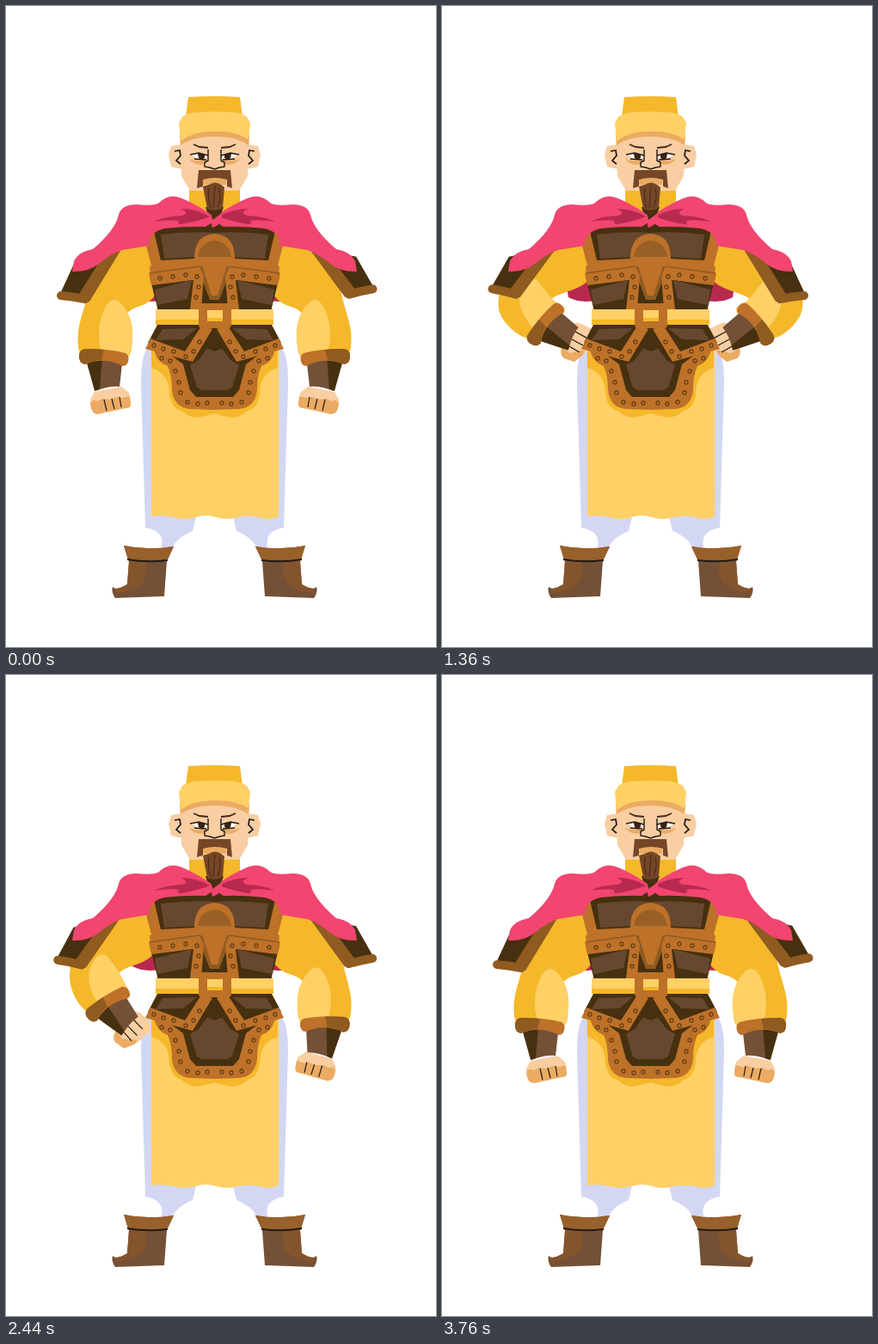
An HTML page with a canvas for the animation above (3.8 s loop, 500x746 px).

```html
<!DOCTYPE html>
<html lang="en">
<head>
<meta charset="utf-8">
<title>Warrior</title>
<style>
html, body { margin: 0; width: 100%; height: 100%; overflow: hidden; background: #fff; }
canvas { display: block; width: 500px; height: 746px; }
</style>
</head>
<body>
<canvas id="stage" width="500" height="746"></canvas>
<script>
const ctx = document.getElementById('stage').getContext('2d');
const LOOP = 3800, STEP = 40;
const C = {
  light: '#ffd066', gold: '#f4b82a', pink: '#f24570', crimson: '#b82950',
  copper: '#bd7129', rust: '#8f5b20', dark: '#46300f', brown: '#664830', boot: '#745036',
  skin: '#f8cea2', tan: '#ebab62', leg: '#d3d7f4', ink: '#201a18'
};

function fill(color, d) {
  ctx.fillStyle = color;
  ctx.fill(new Path2D(d));
}
function line(color, width, d) {
  ctx.strokeStyle = color;
  ctx.lineWidth = width;
  ctx.stroke(new Path2D(d));
}
function rivets(points) {
  ctx.strokeStyle = '#5e3a12';
  ctx.lineWidth = 1.1;
  for (const [x, y] of points) {
    ctx.beginPath();
    ctx.arc(x, y, 2.1, 0, 7);
    ctx.stroke();
  }
}
function mirrored(draw) {
  ctx.save();
  ctx.translate(485, 0);
  ctx.scale(-1, 1);
  draw();
  ctx.restore();
}
function both(draw) {
  draw();
  mirrored(draw);
}
const mix = (a, b, p) => a + (b - a) * p;

function turned(x, y, degrees, draw) {
  ctx.save();
  ctx.translate(x, y);
  ctx.rotate(degrees * Math.PI / 180);
  ctx.translate(-x, -y);
  draw();
  ctx.restore();
}

// Closed soft outline between two poses of control points.
function blob(color, from, to, p) {
  const pts = from.map(([x, y], i) => [mix(x, to[i][0], p), mix(y, to[i][1], p)]);
  ctx.fillStyle = color;
  ctx.beginPath();
  pts.forEach(([x, y], i) => {
    const [nx, ny] = pts[(i + 1) % pts.length];
    const [px, py] = pts[(i + pts.length - 1) % pts.length];
    if (!i) ctx.moveTo((px + x) / 2, (py + y) / 2);
    ctx.quadraticCurveTo(x, y, (x + nx) / 2, (y + ny) / 2);
  });
  ctx.fill();
}

const SLEEVE_DOWN = [[112, 270], [184, 270], [180, 342], [133, 356], [149, 384], [142, 418], [86, 414], [82, 380], [93, 345], [100, 312]];
const SLEEVE_UP = [[112, 270], [184, 270], [178, 322], [122, 340], [134, 347], [146, 354], [106, 392], [78, 376], [62, 350], [74, 312]];
const INNER_DOWN = [[123, 335], [144, 357], [149, 386], [140, 418], [111, 412], [106, 370]];
const INNER_UP = [[104, 310], [122, 334], [134, 347], [148, 352], [116, 390], [84, 345]];
const FOREARM_TURN = -56;

const settle = (ms, k) => ms <= 0 ? 0 : 1 - (1 + k * ms) * Math.exp(-k * ms);
const raise = (t, lowerAt) => settle(t - 520, .0108) * (1 - settle(t - lowerAt, .01));

function fist() {
  fill(C.skin, 'M103 449L134 443L143 450L145 462Q145 468 139 468L107 475Q101 475 99 468L98 458Z');
  fill(C.tan, 'M98 462Q101 457 106 460L113 457L121 458L129 455L136 456L144 454L145 464Q145 468 139 468L107 475Q101 475 99 468Z');
  line(C.ink, 1.2, 'M114 458L117 471M123 457L126 469M132 455L134 467');
}
function hipHand() {
  fill(C.skin, 'M148 373Q153 367 160 369L173 375L177 386L166 404L154 414L142 410Q137 406 139 399Z');
  fill(C.tan, 'M139 398L149 404L166 400L164 406L154 414L142 410Q137 406 139 398Z');
  line(C.ink, 1.2, 'M155 379L168 386M151 388L164 395M148 396L160 403');
}

function forearm(p) {
  ctx.save();
  ctx.translate(mix(0, 6, p), mix(0, -38, p));
  turned(113, 408, FOREARM_TURN * p, () => {
    if (p < .5) {
      ctx.save();
      ctx.translate(0, -10 * p);
      fist();
      ctx.restore();
    } else {
      turned(113, 408, -FOREARM_TURN, () => {
        ctx.translate(-6, 38);
        hipHand();
      });
    }
    fill(C.boot, 'M92 408L136 408L132 443Q120 442 104 448Z');
    fill(C.dark, 'M92 408H112L109 446L103 448Z');
    fill(C.copper, 'M85 405Q87 398 95 399Q120 399 139 404Q144 407 142 414Q139 421 134 418Q112 408 92 417Q84 416 85 405Z');
    fill(C.rust, 'M85 405Q87 398 95 399Q104 399 114 400L111 412Q101 412 92 417Q84 416 85 405Z');
  });
  ctx.restore();
}

function arm(p) {
  blob(C.gold, SLEEVE_DOWN, SLEEVE_UP, p);
  blob(C.light, INNER_DOWN, INNER_UP, p);
  forearm(p);
}

function pad(p) {
  turned(150, 270, 5 * p, () => {
    fill(C.dark, 'M80 298L134 282L96 344L62 337Z');
    fill(C.rust, 'M112 292L136 280L97 344L82 340Z');
    ctx.lineCap = 'round';
    line(C.rust, 10, 'M64 337Q77 338 92 341');
    ctx.lineCap = 'butt';
  });
}

function legs() {
  both(() => {
    fill(C.leg, 'M166 398Q157 402 157 440L162 607Q185 611 181 630H194Q198 619 217 611L222 590V398Z');
    fill(C.boot, 'M137 628Q165 634 195 629L187 646L184 687Q155 688 127 689Q122 682 124 676Q128 681 141 673L143 647Z');
    fill('#84542c', 'M143 646H163Q165 670 154 675Q143 682 128 683L124 676Q128 681 141 673Z');
    fill('#98602a', 'M137 628Q165 634 195 629L187 646Q163 648 142 645Z');
    line(C.ink, 2, 'M141 644Q163 648 188 645');
  });
}

function skirt() {
  fill(C.light, 'M169 396H317V594Q307 599 298 596Q284 592 270 595Q256 599 244 595Q233 591 220 595Q208 599 195 595Q181 592 169 594Z');
  both(() => fill(C.gold, 'M169 396V421Q190 427 190 452Q193 469 204 471Q213 479 222 479Q234 477 243 474V396Z'));
}

function armorHalf() {
  // Lower plate
  fill(C.copper, 'M172 398Q174 414 188 419Q193 430 193 447Q195 467 214 469L243 470V398Z');
  fill(C.dark, 'M190 405L206 417L214 447L221 455H243V390Z');
  fill(C.brown, 'M243 386L224 412L214 418L222 444L228 447H243Z');
  rivets([[181, 410], [191, 413], [197, 425], [201, 438], [203, 450], [211, 461], [223, 463], [234, 462]]);
  // Chest
  fill(C.dark, 'M175 261Q208 250 243 250V402L176 378V351L167 315Z');
  fill(C.copper, 'M162 275L174 261L181 291L222 292V301L170 306Z');
  fill(C.dark, 'M172 262Q205 250 243 250V293L180 296Z');
  fill(C.brown, 'M180 266Q212 262 243 264V291L184 294Z');
  fill(C.copper, 'M167 303L219 294Q219 266 243 265V306H226L168 312Z');
  fill('#986027', 'M223 292Q226 274 243 273V292Z');
  fill(C.rust, 'M222 303H243V342H237Z');
  fill(C.copper, 'M228 302H243V337H239Z');
  // Side panel
  fill(C.copper, 'M166 311L225 303L230 314L227 353H214L218 319L169 325Z');
  line(C.rust, 1.6, 'M167 311L225 303');
  fill(C.dark, 'M171 326L216 319L212 353H177Z');
  fill(C.brown, 'M173 330L216 319L211 341L176 348Z');
  rivets([[179, 317], [194, 315], [209, 313], [222, 315], [224, 327], [221, 339]]);
  // Flap
  fill(C.dark, 'M176 371H240L231 383L208 405L165 392Z');
  fill(C.brown, 'M182 376L222 375L206 388L174 389Z');
  fill(C.copper, 'M168 387L208 402L228 371L240 376L217 414L162 399Z');
  rivets([[172, 395], [183, 399], [195, 402], [209, 408], [218, 402], [225, 391]]);
}

function belt() {
  fill(C.light, 'M174 353H311V371H174Z');
  fill(C.gold, 'M174 365H311V371H174Z');
  fill(C.copper, 'M228 346H258Q262 346 262 350V371Q262 375 258 375H228Q224 375 224 371V350Q224 346 228 346Z');
  fill(C.light, 'M234 354H252V367H234Z');
  fill(C.gold, 'M234 363H252V367H234Z');
}

function collar() {
  fill(C.gold, 'M213 214H272V246H213Z');
  fill(C.dark, 'M232 234H253L246 254H238Z');
}

function cape() {
  both(() => {
    fill(C.pink, 'M243 246Q224 232 205 224Q190 217 178 229Q173 233 152 231Q134 231 131 243Q127 261 101 283Q84 286 79 297L77 309Q95 310 108 300Q122 288 135 284L166 279Q166 263 184 259Q212 256 232 257L243 250Z');
    fill(C.crimson, 'M237 245Q222 236 203 236Q215 241 204 244Q184 245 172 251Q192 248 201 250Q198 253 203 254Q226 250 237 245Z');
  });
  fill(C.dark, 'M238 240H251L241 252Z');
  fill(C.pink, 'M251 241L240 249Q238 255 240 258Q249 255 251 248Z');
}

function faceHalf() {
  fill(C.skin, 'M205 161L192 163L189 173L192 187L205 190Z');
  fill(C.skin, 'M202 150L204 198L214 215H243V140H215Z');
  fill(C.tan, 'M202 150Q220 143 243 145V152Q219 151 203 162Z');
  fill(C.tan, 'M213 178Q222 182 233 179L232 184Q220 187 213 178Z');
  line(C.ink, 1.7, 'M196 169L202 168L203 174L198 180L203 184');
  fill('#fff', 'M216 173L233 172L234 177L224 179Z');
  fill('#3b2512', 'M223 172H231V177L227 179L224 177Z');
  line(C.ink, 1.6, 'M214 173L224 171L235 174M219 178L233 179');
  line('#42291c', 1.8, 'M218 161L225 164L235 165');
  line(C.ink, 1.4, 'M235 167V180L231 182V187L237 188L243 190');
}

function head() {
  both(faceHalf);
  fill(C.tan, 'M229 200H256V208H229Z');
  fill('#754727', 'M224 191H261L263 212L257 210V202Q243 198 229 202V210L222 212Z');
  fill('#754727', 'M229 210L236 208Q243 203 250 208L254 211L252 235Q243 240 234 236Z');
  line('#4d2d18', 1.2, 'M236 212Q234 224 238 235M243 209L241 235M248 212Q251 223 246 234');
  fill(C.gold, 'M212 106Q243 104 272 106L275 129H209Z');
  fill(C.light, 'M205 129Q212 122 243 123Q273 122 280 129L284 136L282 155Q266 145 243 146Q219 145 203 157L201 136Z');
}

function draw(t) {
  const left = raise(t, 2326), right = raise(t, 1995);
  ctx.fillStyle = '#fff';
  ctx.fillRect(0, 0, 500, 746);
  both(() => fill(C.crimson, 'M140 295H182V342Q162 347 147 339Z'));
  legs();
  skirt();
  arm(left);
  mirrored(() => arm(right));
  both(armorHalf);
  belt();
  pad(left);
  mirrored(() => pad(1 - right));
  collar();
  cape();
  head();
}

function frame() {
  const t = performance.now() % LOOP;
  draw(Math.floor(t / STEP) * STEP);
  requestAnimationFrame(frame);
}
frame();
</script>
</body>
</html>
```
